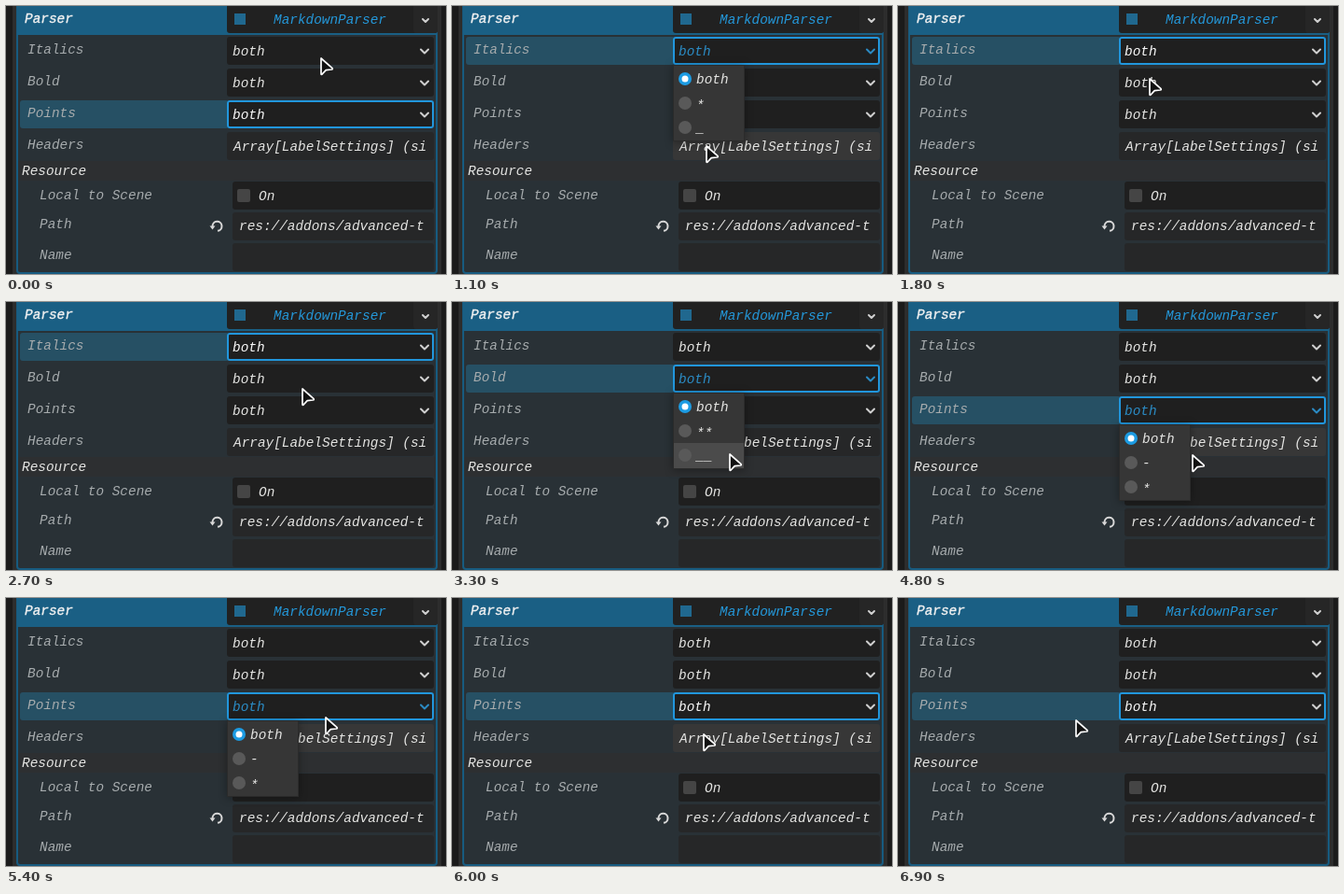
These frames come from a looping animation (472 by 287 pixels, 7 s). An HTML page:

```html
<!DOCTYPE html>
<html lang="en">
<head>
<meta charset="utf-8">
<title>Parser inspector</title>
<style>
  html, body { margin: 0; width: 100%; height: 100%; overflow: hidden; background: #1b1b1b; }
  svg { display: block; width: 472px; height: 287px; }
  text { font: italic 14.4px "Liberation Mono", "DejaVu Sans Mono", monospace; fill: #e4e4e2; }
  .label { fill: #a6abad; }
  .title { fill: #f2f2f2; stroke: #f2f2f2; stroke-width: .35; }
  .accent { fill: #2498da; }
  .field { fill: #1f1f1f; }
  .soft { fill: #262728; }
  .hot { fill: #373737; }
  .chevron { fill: none; stroke: #d0d0d0; stroke-width: 2; stroke-linecap: round; stroke-linejoin: round; }
  .mark, .popup { visibility: hidden; }
  .focus .mark, .open .popup { visibility: visible; }
  .popup { filter: drop-shadow(0 1px 5px rgba(0, 0, 0, .35)); }
  .focus .value { fill: #f8f8f8; }
  .open .value { fill: #2b8bc4; }
  .open .chevron { stroke: #2b8bc4; }
  .ring { fill: none; stroke: #2196dc; stroke-width: 2; }
</style>
</head>
<body>
<svg viewBox="0 0 472 287">
  <rect width="472" height="287" fill="#1b1b1b"/>
  <rect x="7" width="460" height="287" fill="#2d2d2d"/>
  <rect x="12" y="-5" width="450" height="291" rx="3" fill="#293136" stroke="#175b80" stroke-width="2"/>
  <rect x="12" width="450" height="31" fill="#1a5f84"/>
  <rect x="237" y="-4" width="226" height="33" rx="3" fill="#212121"/>
  <rect x="437" y="-4" width="26" height="33" rx="3" fill="#262626"/>
  <rect x="13" y="166" width="448" height="21" fill="#2d2f31"/>
  <text class="title" x="20" y="18">Parser</text>
  <rect x="245" y="8" width="12" height="12" fill="#20688f"/>
  <text class="accent" x="287" y="19">MarkdownParser</text>
  <path class="chevron" d="M447 14l3 3 3-3"/>

  <text class="label" x="23" y="153">Headers</text>
  <rect id="headers" class="soft" x="237" y="135" width="222" height="30" rx="3"/>
  <text x="244" y="155">Array[LabelSettings] (si</text>
  <text x="17" y="181">Resource</text>

  <text class="label" x="36" y="207">Local to Scene</text>
  <rect class="field" x="243" y="188" width="216" height="30" rx="3"/>
  <rect x="248" y="196" width="14" height="14" rx="2" fill="#454545"/>
  <text x="271" y="208">On</text>

  <text class="label" x="36" y="238">Path</text>
  <g stroke="#d8d8d8" fill="none" stroke-width="2">
    <path d="M221.5 236a5 5 0 1 1 5.500 4.800"/>
    <path d="M218.500 235.500h6l-3 4z" fill="#d8d8d8" stroke="none"/>
  </g>
  <rect class="soft" x="243" y="221" width="216" height="30" rx="3"/>
  <text x="250" y="240">res://addons/advanced-t</text>

  <text class="label" x="36" y="271">Name</text>
  <rect class="soft" x="243" y="254" width="216" height="30" rx="3"/>

  <g id="rows"></g>
  <path id="cursor" d="M1 1V17.500Q1 19 2.400 17.800L6.200 13.600 12.300 13Q14 12.700 12.800 11.400Z"
        fill="#111" stroke="#fff" stroke-width="1.700" stroke-linejoin="round"/>
</svg>

<script>
const LOOP = 7000, STEP = 100, MOVE = 400;
const ITEM = 26, ITEM_START = 31;

// Each row is pressed to open its popup, the pointer reaches down, then picks "both".
const rows = [
  { name: 'Italics', y: 47, items: ['both', '*', '_'], opens: 400, closes: 1700,
    press: { x: 338, y: 56 }, reach: { t: 1100, x: 273, y: 150 } },
  { name: 'Bold', y: 81, items: ['both', '**', '__'], opens: 2800, closes: 3800,
    press: { x: 318, y: 93 }, reach: { t: 3300, x: 298, y: 163 } },
  { name: 'Points', y: 115, items: ['both', '-', '*'], opens: 4500, closes: 6000,
    press: { x: 347, y: 122 }, reach: { t: 5000, x: 284, y: 205 } }
];

const stops = rows.flatMap(({ y, opens, closes, press, reach }) => [
  { t: opens - 300, ...press },
  reach,
  { t: closes - 100, x: 270, y: y + ITEM_START }
]).concat(
  { t: 5400, x: 343, y: 128 },
  { t: 6400, x: 42, y: -1 },
  { t: 6900, x: 191, y: 131 }
).sort((a, b) => a.t - b.t);

const byId = id => document.getElementById(id);
const smooth = k => k * k * (3 - 2 * k);
const isOpen = (row, t) => t >= row.opens && t < row.closes;

function itemMarkup(label, i) {
  const y = ITEM_START + ITEM * i;
  const drop = label.includes('*') ? 7 : 5;
  return `<rect class="item" x="238" y="${y - 13}" width="75" height="27" fill="none"/>
    <circle cx="250" cy="${y}" r="7" fill="${i ? '#595959' : '#1c9be2'}"/>
    ${i ? '' : `<circle cx="250" cy="${y}" r="3.5" fill="#fff"/>`}
    <text x="262" y="${y + drop}">${label}</text>`;
}

const rowMarkup = row => `<g class="row" transform="translate(0 ${row.y})">
  <rect class="mark" x="15" y="-14" width="224" height="30" rx="3" fill="#265064"/>
  <text class="label" x="23" y="4">${row.name}</text>
  <rect class="field" x="237" y="-14" width="222" height="30" rx="3"/>
  <rect class="mark ring" x="238" y="-13" width="220" height="28" rx="2"/>
  <text class="value" x="243" y="6">both</text>
  <path class="chevron" d="M445-.5l4 4 4-4"/>
  <g class="popup">
    <rect x="237.5" y="16.5" width="76" height="81" fill="#363636" stroke="#2b2b2b"/>
    ${row.items.map(itemMarkup).join('')}
  </g>
</g>`;

// Later rows come first so that an open popup covers the rows below it.
byId('rows').innerHTML = [...rows].reverse().map(rowMarkup).join('');
const groups = [...document.querySelectorAll('.row')].reverse();

// The pointer rests at each stop and sets off MOVE ms before the next arrival.
function pointerAt(t) {
  const next = stops.findIndex(stop => stop.t > t);
  if (next <= 0) return next ? stops[stops.length - 1] : stops[0];
  const from = stops[next - 1], to = stops[next];
  const span = Math.min(MOVE, to.t - from.t);
  const k = smooth(Math.max(0, 1 - (to.t - t) / span));
  return { x: from.x + (to.x - from.x) * k, y: from.y + (to.y - from.y) * k };
}

// Index of the popup item under the pointer, or -1.
function itemUnder(row, { x, y }) {
  const i = Math.floor((y - row.y - 18) / ITEM);
  return x > 238 && x < 313 && i < row.items.length ? i : -1;
}

function overHeaders(t) {
  const p = pointerAt(t);
  const covered = rows.some(row => isOpen(row, t) && itemUnder(row, p) >= 0);
  return !covered && p.x > 237 && p.x < 459 && p.y >= 135 && p.y < 165;
}

function draw(now) {
  const t = Math.floor(now % LOOP / STEP) * STEP;
  const p = pointerAt(t);
  byId('cursor').setAttribute('transform', `translate(${Math.round(p.x) - 1} ${Math.round(p.y) - 1})`);
  // The field's hover fades one step late.
  byId('headers').setAttribute('class', overHeaders(t) || overHeaders(t - STEP) ? 'hot' : 'soft');

  const focused = rows.filter(row => row.opens <= t).pop() || rows[rows.length - 1];
  rows.forEach((row, i) => {
    const group = groups[i], hovered = itemUnder(row, p);
    group.classList.toggle('focus', row === focused);
    group.classList.toggle('open', isOpen(row, t));
    group.querySelectorAll('.item').forEach((item, n) =>
      item.setAttribute('fill', n === hovered ? '#4b4b4b' : 'none'));
  });
}

const start = performance.now();
function tick() {
  draw(performance.now() - start);
  requestAnimationFrame(tick);
}
tick();
</script>
</body>
</html>
```
